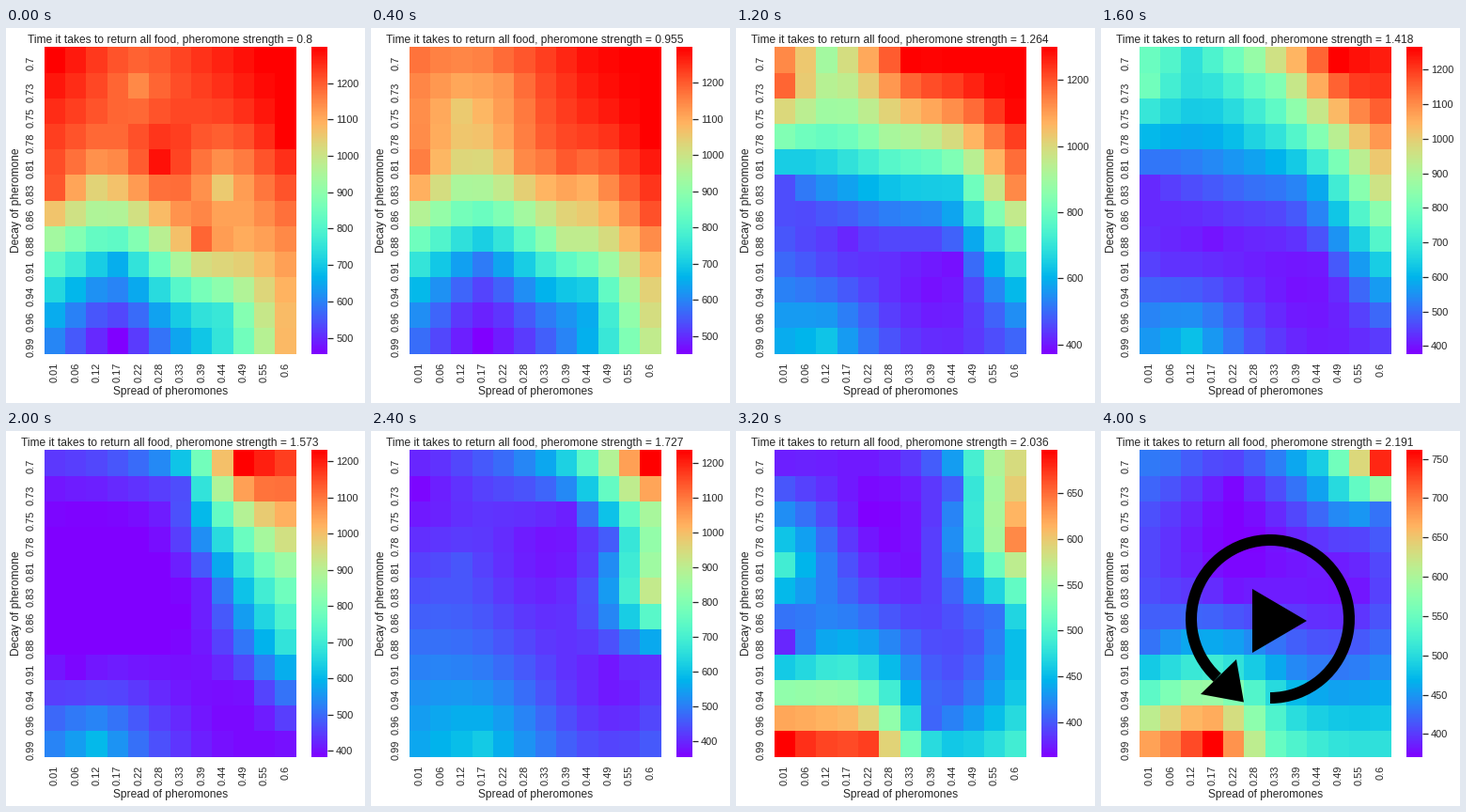
Write a matplotlib script that moves like this. It is 382 px wide and 399 px high and loops after 4700 ms.

```python
import numpy as np
import matplotlib.pyplot as plt
from matplotlib.animation import FuncAnimation
from matplotlib.patches import Polygon, Wedge

W, H, DPI = 382, 399, 72
LEFT, TOP, MAP_W, MAP_H = 40.75, 20.42, 267.84, 326.16
SIZE = 12
INK = "0.15"

plt.rcParams.update({
    "font.family": "Liberation Sans", "font.size": 12,
    "text.color": INK, "axes.labelcolor": INK,
    "xtick.color": INK, "ytick.color": INK,
    "xtick.labelsize": 11, "ytick.labelsize": 11,
    "axes.titlesize": 12, "axes.labelsize": 12,
})


def distances(a, b):
    return np.hypot(*(a[:, None] - b[None]).transpose(2, 0, 1))


def terrain(low, high, *peaks):
    """Smooth surface through a few (column, row, percent) peaks and dips."""
    peaks = np.array(peaks, float)
    spots, levels = peaks[:, :2], peaks[:, 2]
    n = len(spots)
    system = np.ones((n + 1, n + 1))
    system[:n, :n] = distances(spots, spots)
    system[n, n] = 0
    weights = np.linalg.solve(system, np.append(levels, 0))
    cells = np.stack(np.meshgrid(range(SIZE), range(SIZE)), -1).reshape(-1, 2)
    level = distances(cells, spots) @ weights[:n] + weights[n]
    grid = np.clip(level, 0, 100).reshape(SIZE, SIZE)
    return low + (high - low) * grid / 100, low, high


def blend(a, b):
    return tuple((u + v) / 2 for u, v in zip(a, b))


def blend_rescaled(a, b):
    values = blend(a, b)[0]
    return values, values.min(), values.max()


hot = terrain(456, 1299, (0, 0, 100), (4, 1, 82), (11, 3, 100), (5, 4, 98),
              (0, 5, 89), (2, 5, 69), (8, 5, 71), (7, 7, 87), (3, 8, 24),
              (3, 11, 0), (8, 10, 36), (11, 11, 74))
warm = terrain(445, 1299, (0, 0, 70), (4, 0, 85), (2, 2, 53), (10, 2, 100),
               (0, 4, 77), (7, 4, 92), (5, 5, 54), (11, 6, 94), (3, 7, 17),
               (3, 9, 0), (8, 9, 8), (11, 10, 60))
front = terrain(372, 1299, (0, 1, 87), (2, 0, 57), (6, 0, 100), (11, 2, 99),
                (0, 3, 50), (5, 3, 58), (0, 5, 10), (8, 5, 30), (11, 5, 82),
                (3, 7, 5), (8, 8, 2), (2, 11, 28), (11, 11, 13))
corner = terrain(384, 1231, (0, 1, 3), (6, 1, 10), (9, 0, 100), (11, 0, 92),
                 (9, 3, 46), (11, 3, 66), (7, 5, 4), (11, 7, 35), (1, 8, 1),
                 (9, 9, 2), (2, 11, 26), (11, 11, 2))
edge = terrain(354, 1238, (0, 1, 1), (4, 0, 14), (7, 2, 4), (9, 0, 60),
               (11, 0, 100), (11, 2, 58), (9, 3, 12), (2, 4, 11), (11, 5, 63),
               (9, 8, 3), (11, 8, 6), (3, 11, 29))
cool = terrain(362, 697, (0, 0, 4), (8, 1, 12), (10, 0, 59), (4, 2, 0),
               (11, 3, 82), (0, 4, 38), (6, 4, 2), (10, 6, 15), (0, 7, 5),
               (7, 10, 13), (0, 11, 100), (4, 11, 92), (11, 11, 38))
cold = terrain(371, 761, (1, 0, 15), (4, 1, 1), (8, 0, 30), (11, 0, 95),
               (11, 2, 15), (4, 5, 3), (10, 5, 3), (0, 7, 15), (7, 8, 18),
               (0, 9, 43), (0, 11, 78), (3, 11, 100), (6, 11, 45))
scenes = [hot, blend(hot, warm), warm, front, blend(front, corner),
          corner, edge, blend_rescaled(edge, cool), cool, cold]
strengths = np.linspace(0.8, 2.5, 12)

fig = plt.figure(figsize=(W / DPI, H / DPI), dpi=DPI, facecolor="white")


def pixel_axes(x, top, width, height):
    ax = fig.add_axes([x / W, 1 - (top + height) / H, width / W, height / H])
    ax.spines[:].set_visible(False)
    return ax


ax = pixel_axes(LEFT, TOP, MAP_W, MAP_H)
mesh = ax.pcolormesh(hot[0], cmap="rainbow")
ax.set_ylim(SIZE, 0)
centres = np.arange(SIZE) + 0.5
spreads = [str(v) for v in np.linspace(0.01, 0.6, SIZE).round(2)]
decays = [str(v) for v in np.linspace(0.7, 0.99, SIZE).round(2)]
ax.set_xticks(centres, spreads, rotation=90)
ax.set_yticks(centres, decays, rotation=90, va="center_baseline")
ax.tick_params(length=0, pad=9.5)
ax.set_xlabel("Spread of pheromones")
ax.set_ylabel("Decay of pheromone")
title = ax.set_title("", pad=4.8)

bar = pixel_axes(LEFT + MAP_W * 1.0625, TOP, MAP_H / 20, MAP_H)
ramp = bar.imshow(np.linspace(0, 1, 256)[:, None], cmap="rainbow",
                  aspect="auto", origin="lower", interpolation="nearest")
bar.set_xticks([])
bar.yaxis.tick_right()
bar.tick_params(axis="y", length=6, width=1.25, pad=3.5)

overlay = pixel_axes(0, 0, W, H)
overlay.set(xlim=(0, W), ylim=(H, 0))
overlay.axis("off")
replay = [
    Wedge((180, 200), 90, -228, 90, width=12),
    Polygon([(144, 243), (152, 288.5), (106, 280)]),
    Polygon([(161, 168), (161, 236), (219, 202)]),
]
for shape in replay:
    shape.set(facecolor="black", edgecolor="none")
    overlay.add_patch(shape)


def draw(frame):
    step = frame // 4
    index = min(step, len(scenes) - 1)
    values, low, high = scenes[index]
    mesh.set_array(values)
    mesh.set_clim(low, high)
    ramp.set_extent((0, 1, low, high))
    bar.set_ylim(low, high)
    title.set_text("Time it takes to return all food, pheromone strength = "
                   f"{round(float(strengths[index]), 3)}")
    for shape in replay:
        shape.set_visible(step >= len(scenes))
    return [mesh, ramp, title, *replay]


anim = FuncAnimation(fig, draw, frames=47, interval=100, repeat=True,
                     repeat_delay=0, blit=False)
plt.show()
```
